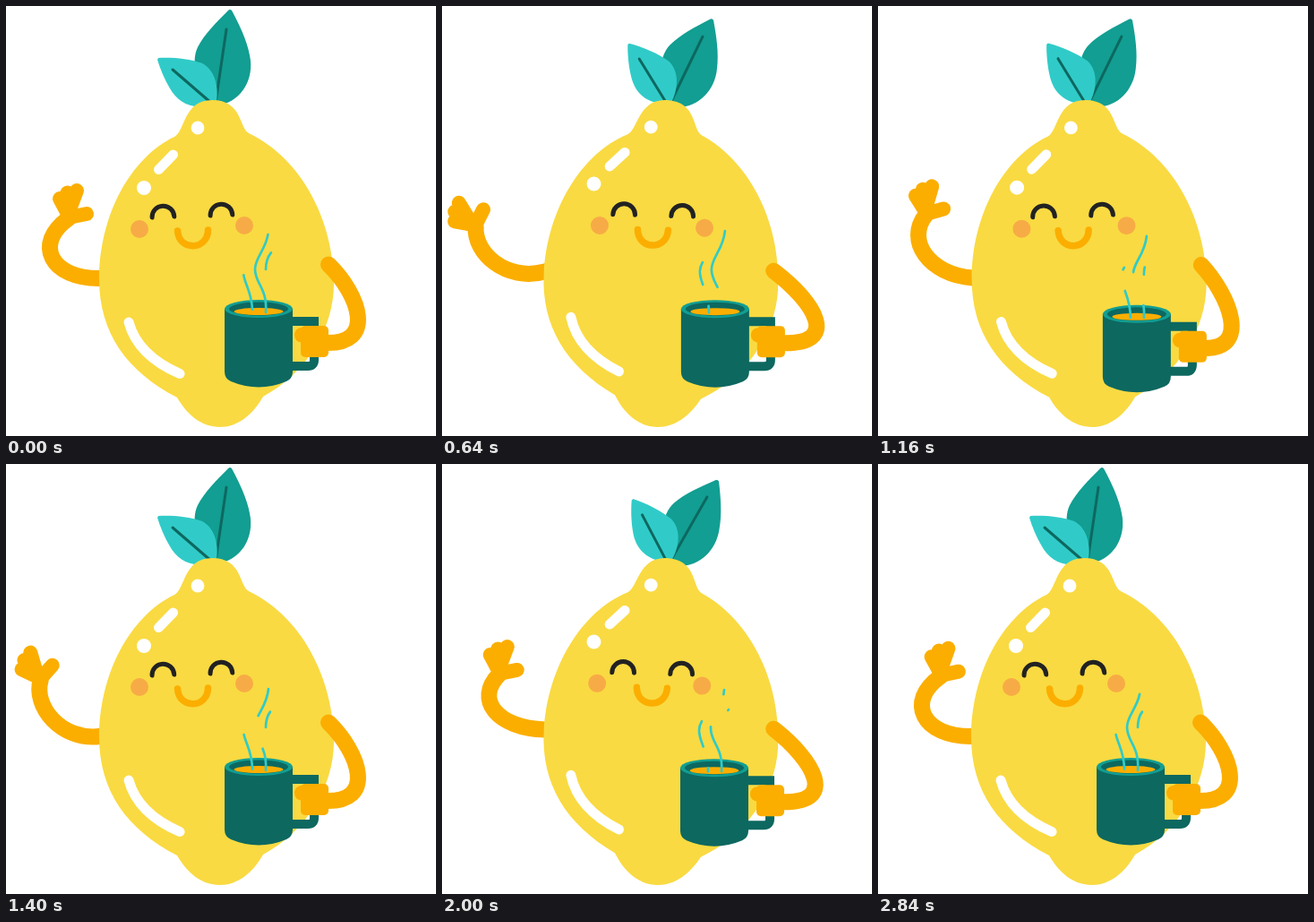
Write an HTML page that moves like this. It is 480x480 px and loops after 2880 ms.

```html
<!DOCTYPE html>
<html lang="en">
<head>
<meta charset="utf-8">
<title>Waving lemon</title>
<style>
  html, body { margin: 0; width: 100%; height: 100%; overflow: hidden; background: #fff; }
  svg { display: block; width: 100%; height: 100%; }
  .line { fill: none; stroke-linecap: round; stroke-linejoin: round; }
  .limb { stroke: #fbae00; stroke-width: 18; }
  .finger { stroke: #fbae00; stroke-width: 16; }
  .vein { stroke: #0d6860; stroke-width: 3; }
  .shine { stroke: #fff; stroke-width: 11; }
  .eye { stroke: #222; stroke-width: 5; }
  .steam { stroke: #30cbc8; stroke-width: 2.7; }
</style>
</head>
<body>
<svg viewBox="0 0 480 480">
  <path id="leftArm" class="line limb"/>
  <g id="hand">
    <path fill="#fbae00" d="M60 215L68 206L79 206L78 236L60 232Z"/>
    <path class="line finger" d="M68 230L60 215M69 230L68.500 208.500M70 230L79 206M70 236L90 232"/>
  </g>

  <g id="body">
    <g id="leaves">
      <path fill="#129e92" d="M234 111C262 109 278 82 272 55C269 38 260 20 252 5Q250 3 248 5C236 17 221 32 214 46C206 62 212 90 234 111Z"/>
      <path class="line vein" d="M234 108L246 26"/>
      <path fill="#30cbc8" d="M170 58C185 57 205 59 218 63.500C232 70 238 88 235 107L228 111C205 116 191 106 183 92C177 82 172 70 169 60Z"/>
      <path class="line vein" d="M186 71L230 109"/>
    </g>
    <path fill="#f9da42" d="M188 146C200 140 198 105 230 105C264 105 260 136 271 142C330 170 366 240 366 310C366 360 335 410 287 436C275 457 258 470 239 470C218 470 202 456 191 437C135 408 104 365 104 305C104 235 138 170 188 146Z"/>
    <g fill="#fff">
      <circle cx="214" cy="136" r="7.4"/>
      <circle cx="154" cy="203" r="8"/>
    </g>
    <path class="line shine" d="M170.500 182.500L186.500 166M137 353Q147 390 194 410.500"/>
    <g id="cheeks" fill="#f7ab46">
      <circle cx="149" cy="249" r="10"/>
      <circle cx="266" cy="245" r="10"/>
    </g>
    <g id="smile">
      <path class="line eye" d="M163 236A12.300 12.300 0 0 1 187.700 235M228 234A12.300 12.300 0 0 1 252.700 233"/>
      <path class="line" stroke="#fbae00" stroke-width="7.500" d="M191.500 251C193 274 225 273 225.500 250"/>
    </g>
  </g>

  <g id="cup">
    <path fill="none" stroke="#0d6860" stroke-width="10" d="M318 352H344V395Q344 402 337 402H318"/>
    <path fill="#0d6860" d="M244 338V408Q244 416 251 419Q282 432 313 419Q320 416 320 408V338Z"/>
    <ellipse cx="282" cy="338" rx="38" ry="10" fill="#129e92"/>
    <ellipse cx="282" cy="338" rx="33" ry="7.500" fill="#0d6860"/>
    <ellipse cx="282" cy="341" rx="27.500" ry="4" fill="#fbae00"/>
    <path id="steamLong" class="line steam" d="M290 342C292 315 278 310 278 294C278 280 291 272 293 251"/>
    <path id="steamLeft" class="line steam" d="M275 342C275 318 265 310 265 296Q265 291 268 286"/>
    <path id="steamRight" class="line steam" d="M290 294C290 284 293 278 298 273"/>
  </g>

  <path id="rightArm" class="line limb"/>
  <g id="grip" fill="#fbae00">
    <rect x="329" y="357" width="31" height="35" rx="5"/>
    <rect x="322" y="359" width="30" height="16.500" rx="8"/>
  </g>
</svg>
<script>
const LOOP = 2880, SWAY = 1440, WAVE = 960;
const TILT = 3.3 * Math.PI / 180;
const SMILE_LEAD = 50;
const el = Object.fromEntries([...document.querySelectorAll('[id]')].map(e => [e.id, e]));
const set = (node, name, value) => node.setAttribute(name, value);
const lerp = (a, b, k) => a + (b - a) * k;

// Periodic monotone cubic through [time, value] keys.
function track(period, keys) {
  const n = keys.length;
  const key = i => {
    const turn = Math.floor(i / n), [time, value] = keys[i - turn * n];
    return [time + turn * period, value];
  };
  const secant = i => (key(i + 1)[1] - key(i)[1]) / (key(i + 1)[0] - key(i)[0]);
  const slope = i => {
    const a = secant(i - 1), b = secant(i);
    return a * b > 0 ? 2 * a * b / (a + b) : 0;
  };
  return t => {
    t %= period;
    let i = n - 1;
    while (key(i)[0] > t) i--;
    const [t0, v0] = key(i), [t1, v1] = key(i + 1);
    const d = t1 - t0, u = (t - t0) / d, w = 1 - u;
    return v0 * w * w * (1 + 2 * u) + v1 * u * u * (3 - 2 * u)
      + d * u * w * (slope(i) * w - slope(i + 1) * u);
  };
}

const bodyLean = track(SWAY, [[0, 0], [240, .47], [560, 1], [640, 1], [1040, .12], [1160, .07], [1400, 0]]);
const faceShift = track(SWAY, [[0, 0], [240, .08], [560, .79], [660, 1], [1040, .84], [1160, .74], [1400, 0]]);
const leafAngle = track(SWAY, [[0, 0], [240, 1.9], [560, 18.1], [640, 14.3], [1040, 19.6], [1160, 17.6], [1400, 0]]);
const cupShift = track(SWAY, [[0, 0], [240, .08], [560, .956], [680, 1], [1040, .674], [1160, .3], [1400, 0]]);
const wavePath = track(WAVE, [[0, 0], [80, .1], [200, .3], [560, .98], [610, 1], [720, .67], [920, 0]]);
const waveTurn = track(WAVE, [[0, 0], [80, 0], [200, .08], [560, .96], [630, 1], [720, .87], [920, .02]]);

// A dash rising along a strand; "travel" is the time it takes to pass the whole strand.
function steam(node, travel, period, start, dash) {
  set(node, 'pathLength', travel);
  set(node, 'stroke-dasharray', `${dash} ${period - dash}`);
  return t => set(node, 'stroke-dashoffset', start + dash - t);
}
const strands = [
  steam(el.steamLong, 2110, LOOP, 860, 2020),
  steam(el.steamLeft, 1290, SWAY, 480, 890),
  steam(el.steamRight, 550, SWAY, 965, 510)
];

// Where a point of the body lands once it leans about its foot.
function leaned(x, y, lean) {
  const c = Math.cos(lean * TILT), s = Math.sin(lean * TILT);
  return [240 + (x - 240) * c - (y - 470) * s, 470 + (x - 240) * s + (y - 470) * c];
}

function drawLeftArm(t, lean) {
  const q = wavePath(t), p = 1 - q;
  const [sx, sy] = leaned(105, 304, lean);
  const wx = p * p * 70 + 2 * p * q * 38 + q * q * 37.6;
  const wy = p * p * 237 + 2 * p * q * 225 + q * q * 248;
  const dx = lerp(-43, -55, p * p), dy = 1 + 1.15 * (wy - 237);
  const ex = wx + lerp(-8, -40, p * p) + .6 * (sx - 105), ey = wy + lerp(28, 30, q);
  set(el.leftArm, 'd', `M${sx - dx * .3} ${sy - dy * .3}L${sx} ${sy}C${sx + dx} ${sy + dy} ${ex} ${ey} ${wx} ${wy}`);
  set(el.hand, 'transform', `translate(${wx} ${wy}) rotate(${-52 * waveTurn(t)}) translate(-70 -237)`);
}

function drawRightArm(lean, cx, cy) {
  const [sx, sy] = leaned(360, 288.5, lean);
  const bend = .27 * (sx - 360) + .33 * cx - cy;
  const hx = 355 + cx, hy = 376 + cy;
  set(el.rightArm, 'd', `M${sx} ${sy}C${sx + 35 + bend} ${sy + 34} ${hx + 59 + bend} ${hy + 3} ${hx} ${hy}`);
}

function draw(t) {
  const lean = bodyLean(t), c = cupShift(t);
  const cx = 23 * c, cy = 28 * c * (1 - c);
  const cupMove = `translate(${cx} ${cy})`;
  set(el.body, 'transform', `rotate(${3.3 * lean} 240 470)`);
  set(el.cheeks, 'transform', `translate(${14.3 * faceShift(t)} 0)`);
  set(el.smile, 'transform', `translate(${14.3 * faceShift(t + SMILE_LEAD)} 0)`);
  set(el.leaves, 'transform', `rotate(${leafAngle(t)} 232 108)`);
  set(el.cup, 'transform', cupMove);
  set(el.grip, 'transform', cupMove);
  drawLeftArm(t, lean);
  drawRightArm(lean, cx, cy);
  strands.forEach(rise => rise(t));
}

const begin = performance.now();
function frame() {
  draw((performance.now() - begin) % LOOP);
  requestAnimationFrame(frame);
}
frame();
</script>
</body>
</html>
```
